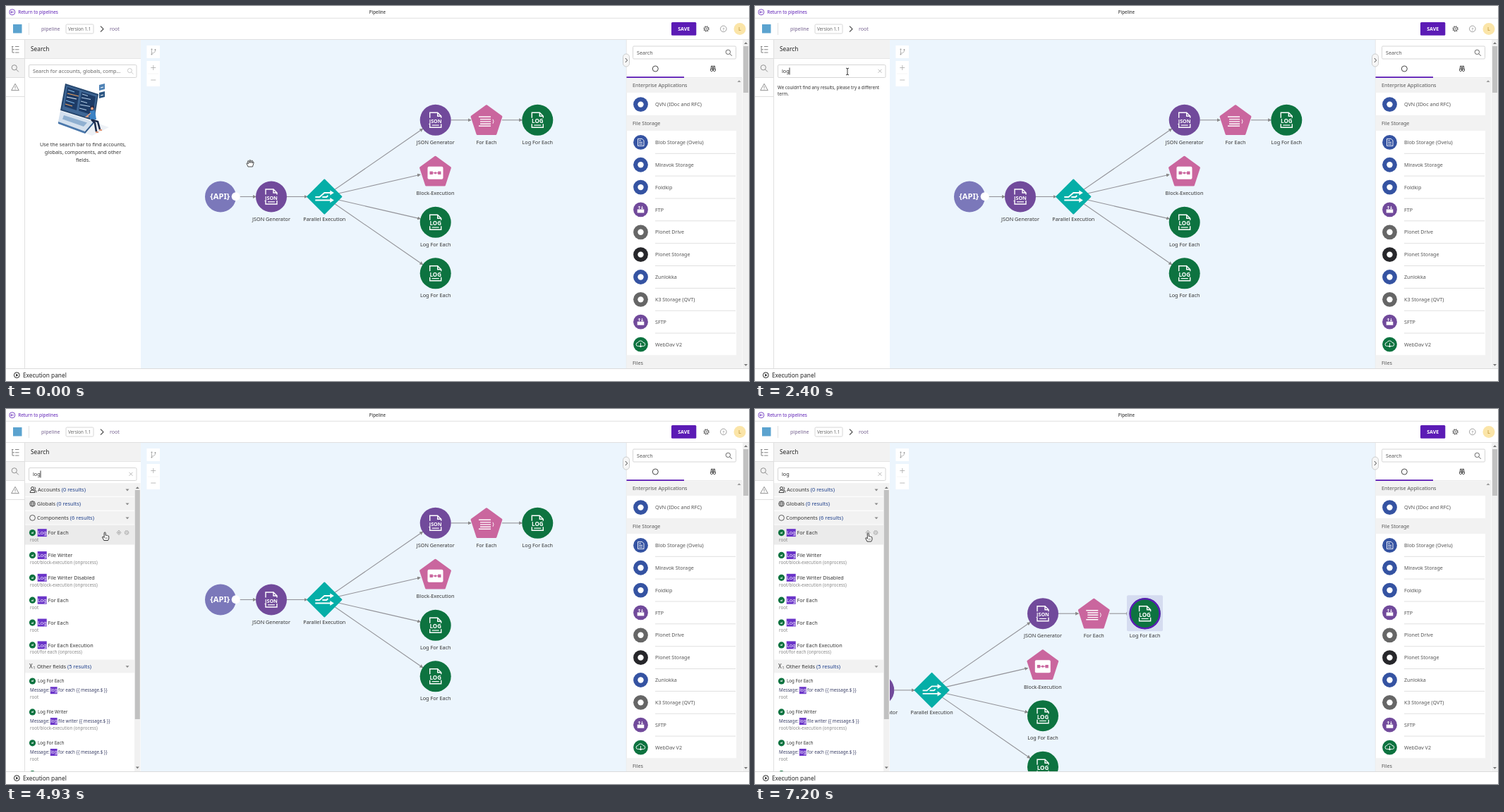
An HTML page that plays this animation: 1053 by 532 pixels, repeating every 8 s.

```html
<!DOCTYPE html>
<html lang="en">
<head>
<meta charset="utf-8">
<title>Pipeline search</title>
<style>
html, body { margin: 0; width: 100%; height: 100%; overflow: hidden; background: #fff; }
svg { display: block; width: 1053px; height: 532px; font-family: "Noto Sans", "Open Sans", sans-serif; }
</style>
</head>
<body>
<svg id="stage" viewBox="0 0 1053 532"></svg>
<script>
const PURPLE = '#5b1bb5', VIOLET = '#714a9b', GREEN = '#0d7340', BLUE = '#3553a2', TEAL = '#05aea7',
      PINK = '#ca669e', GREY = '#f2f2f2', LINE = '#d9d9d9', SKY = '#ecf5fd', INK = '#333';
const BODY = 7.26, SMALL = 6.22, BIG = 8.3;

// y is the visual middle of the text
const text = (x, y, str, size = BODY, fill = INK, more = '') =>
  `<text x="${x}" y="${y + size * .36}" font-size="${size}" fill="${fill}" ${more}>${str}</text>`;
const mid = (x, y, str, size, fill, more = '') => text(x, y, str, size, fill, 'text-anchor="middle" ' + more);
const rect = (x, y, w, h, fill, more = '') => `<rect x="${x}" y="${y}" width="${w}" height="${h}" fill="${fill}" ${more}/>`;
const circle = (x, y, r, fill, more = '') => `<circle cx="${x}" cy="${y}" r="${r}" fill="${fill}" ${more}/>`;
const path = (d, stroke = '#666', width = .8, fill = 'none', more = '') =>
  `<path d="${d}" stroke="${stroke}" stroke-width="${width}" fill="${fill}" ${more}/>`;
const shape = (points, fill, more = '') => `<polygon points="${points}" fill="${fill}" ${more}/>`;
const at = (x, y, body) => `<g transform="translate(${x} ${y})">${body}</g>`;
const group = (id, body) => `<g id="${id}">${body}</g>`;
const box = (x, y, w, h, stroke = '#ccc') => rect(x + .5, y + .5, w, h, '#fff', `rx="1.5" stroke="${stroke}" stroke-width=".8"`);
const lens = (x, y, r, stroke) => at(x, y, path(`M${r * .55} ${r * .55}L${r * 1.5} ${r * 1.5}`, stroke) +
  circle(-r * .2, -r * .2, r, 'none', `stroke="${stroke}" stroke-width=".8"`));
const gear = (x, y, r, stroke) => circle(x, y, r, 'none', `stroke="${stroke}" stroke-width="${r * .45}" stroke-dasharray="${r * .42} ${r * .365}"`) +
  circle(x, y, r * .75, 'none', `stroke="${stroke}" stroke-width=".7"`) + circle(x, y, r * .25, stroke);
const triangle = (x, y, dir, fill = '#777') => path(`M${x - 2.5} ${y - dir}h5l-2.5 ${dir * 2.8}z`, 'none', 0, fill);

// Pipeline nodes
const label = (str, y = 31.5) => mid(0, y, str);
const fileNode = (x, y, name, tag, fill, size) => at(x, y, circle(0, 0, 22, fill) +
  path('M-8 -3V-10.5H3L8 -5.5V-3M3 -10.5V-5.5H8', '#fff', 1.4) +
  path('M-8 5.5V10.5H8V5.5', '#fff', 1.4) + path('M-5 7.3H5', '#fff', 1.2) +
  mid(0, 1.5, tag, size, '#fff', 'font-weight="700"') + label(name));
const jsonNode = (x, y) => fileNode(x, y, 'JSON Generator', 'JSON', VIOLET, 7.2);
const logNode = (x, y) => fileNode(x, y, 'Log For Each', 'LOG', GREEN, 8);
const pentagon = Array.from({ length: 5 }, (_, i) => {
  const a = (i * 72 - 90) * Math.PI / 180;
  return `${22 * Math.cos(a)},${2 + 22 * Math.sin(a)}`;
}).join(' ');
const pentaNode = (x, y, name, icon) => at(x, y,
  shape(pentagon, PINK, `stroke="${PINK}" stroke-width="3" stroke-linejoin="round"`) + icon + label(name));

// Links run from centre to centre and stop at the rim of each node
function link([x1, y1], [x2, y2], from = 22, to = 22) {
  const d = Math.hypot(x2 - x1, y2 - y1), ux = (x2 - x1) / d, uy = (y2 - y1) / d;
  return path(`M${x1 + ux * from} ${y1 + uy * from}L${x2 - ux * to} ${y2 - uy * to}`, '#939399', 1.1, 'none', 'marker-end="url(#tip)"');
}
const api = [304, 270.5], json = [376, 270.5], split = [451.3, 270.5], json2 = [608.7, 161.8], each = [681, 161.8],
      log = [753.3, 161.8], block = [608.5, 234.3], log2 = [608.7, 306.8], log3 = [608.7, 379.3];

const pipeline =
  link(api, json, 27) + link(json, split, 22, 24.5) + [json2, block, log2, log3].map(n => link(split, n, 18)).join('') +
  link(json2, each) + link(each, log) +
  group('selection', rect(727.7, 135.8, 51, 51, '#d5dcf0', 'rx="2"')) +
  circle(...api, 22, '#7b78ba') + circle(325.7, 270.2, 6, '#fff') +
  mid(303.3, 270, '{API}', 11.2, '#fff', 'font-weight="700"') +
  jsonNode(...json) +
  at(...split, shape('0,-24 24,0 0,24 -24,0', TEAL, `stroke="${TEAL}" stroke-width="2" stroke-linejoin="round"`) +
    path('M-13 .5H-7L0 -5.5H9M-13 5H9M-3 .5H3L5 -1.5', '#fff', 1.9) +
    path('M8 -9l5.5 3.5l-5.5 3.5zM8 1.5l5.5 3.5l-5.5 3.5z', 'none', 0, '#fff') + label('Parallel Execution')) +
  jsonNode(...json2) +
  pentaNode(...each, 'For Each', path('M-11 -4.5H6M-9 -1.2H6M-9 2.1H6M-9 5.4H6M-11 8.5H6', '#fff', 1.4) + path('M9 -1q2 3 0 6', '#fff', .9)) +
  logNode(...log) +
  pentaNode(...block, 'Block-Execution', rect(-11, -6.5, 22, 18, '#fff', 'rx="2"') +
    path('M-5 2.5H5', PINK, 1) + rect(-8, .3, 4.4, 4.4, PINK) + circle(0, 2.5, 1.6, PINK) + rect(3.6, .3, 4.4, 4.4, PINK)) +
  logNode(...log2) + logNode(...log3) +
  group('ring', circle(...log, 21, 'none', `stroke="${PURPLE}" stroke-width="2.4"`));

const controls = rect(199.5, 56, 18.5, 18, '#fff') + rect(199.5, 78, 18.5, 36, '#fff') +
  path('M206.5 62.5v5M206.5 67q5 0 5 -4', '#999', .7) + circle(206.5, 61.5, 1, '#999') + circle(206.5, 68.5, 1, '#999') + circle(211.5, 62, 1, '#999') +
  path('M205.3 87.5h7M208.8 84v7M205.3 105h7', '#aaa', .8) + path('M201 96h15', '#eee', .6);

// Header, rail and footer
const chrome = rect(0, 0, 1053, 48, '#fff') + path('M0 17.3H1053M0 47.5H1053', LINE, .8) +
  circle(8.8, 8.7, 4, 'none', `stroke="${PURPLE}" stroke-width=".8"`) + path('M11 8.7H6.7M8.5 6.9L6.7 8.7l1.8 1.8', PURPLE) +
  text(17.3, 8.7, 'Return to pipelines', 6.35, PURPLE) + mid(526.5, 8.7, 'Pipeline', SMALL, '#222') +
  rect(10, 26, 12.5, 12.5, '#5ba3cf') + path('M32.5 24V41', LINE) +
  text(50, 32.5, 'pipeline', 7.1, '#75618f') + box(84.5, 25.5, 39, 13) + text(88, 32.5, 'Version 1.1', SMALL, '#666') +
  path('M134 28.7l4 4l-4 4', '#444', 1.1) + text(147, 32.5, 'root', 7.1, '#75618f') +
  rect(943, 23, 35.3, 18.8, PURPLE, 'rx="1.5"') + mid(960.7, 32.5, 'SAVE', 7, '#fff', 'font-weight="700"') +
  gear(992.6, 32.4, 3.4, '#555') + circle(1016.8, 32.4, 4.3, 'none', 'stroke="#888" stroke-width=".8"') + mid(1016.8, 32.4, '?', 6, '#777') +
  circle(1040, 32.5, 8.5, '#fbe5a8') + mid(1040, 32.5, 'L', 7.3, '#b98a2c');
const rail = rect(0, 48, 191, 467, '#fff') + rect(0, 74.5, 26, 27, GREY) + path('M26.5 48V515M0 74.5H26M0 101.5H26M0 128.5H26', LINE, .8) +
  path('M9 57.5V66H12M9 61.8H12M13 57.5H18.5M13 61.8H18.5M13 66H18.5M8 57.5H10.5', '#777', .9) + lens(12.5, 88, 3.6, '#777') +
  path('M13 110.3L18.3 119.7H7.7zM13 113.6V116.7M13 117.6V118.5', '#777', .8) +
  rect(27, 48, 164, 26.5, GREY) + path('M27 74.5H191', LINE, .6) + text(35, 61.2, 'Search', BIG, '#222') + box(32, 83, 152.5, 18);
const footer = rect(0, 514.5, 1053, 18, '#fff') + path('M0 514.5H1053', LINE, .9) +
  circle(15.3, 523.7, 3.9, 'none', 'stroke="#222" stroke-width="1"') + path('M14.2 521.7l3.2 2l-3.2 2z', 'none', 0, '#222') +
  text(24, 523.7, 'Execution panel', BIG, '#222');

// Component palette on the right
const plainMark = y => circle(899.5, y, 4.2, '#fff');
const transferMark = y => path(`M894.7 ${y - .5}h9.6v5h-9.6z`, 'none', 0, '#fff') +
  path(`M897.5 ${y - 1}v-4m-1.5 1.5l1.5 -1.5l1.5 1.5M901.5 ${y - 5}v4m-1.5 -1.5l1.5 1.5l1.5 -1.5`, '#fff', .9);
const docMark = y => path(`M895.5 ${y - 5}h6l2.5 2.5v7.5h-8.5zM897 ${y}h5M897 ${y + 2.5}h5M897 ${y - 2.5}h3`, '#fff', .9);
const cloudMark = y => path(`M895.5 ${y + 2.5}a2.5 2.5 0 0 1 0 -5a4 4 0 0 1 7.5 0a2.5 2.5 0 0 1 .5 5zM899.5 ${y - 2}v6m-2 -2l2 2l2 -2`, '#fff', .9);
const item = ([name, fill, mark], y) => circle(899.5, y, 10.4, fill) + mark(y) +
  text(920, y, name, 7.15, '#555', 'font-weight="300"');
const files = [
  ['Blob Storage (Ovelu)', BLUE, docMark], ['Miravok Storage', BLUE, plainMark], ['Foldkip', BLUE, plainMark],
  ['FTP', VIOLET, transferMark], ['Plonet Drive', '#666', plainMark], ['Plonet Storage', '#27272b', plainMark],
  ['Zunlokka', BLUE, plainMark], ['K3 Storage (QVT)', '#666', plainMark], ['SFTP', VIOLET, transferMark], ['WebDav V2', GREEN, cloudMark]
];
const section = (y, h, name, textY) => rect(879.5, y, 155.5, h, GREY) + text(888, textY, name, 7.15, '#555');
const palette = rect(879, 48, 174, 467, '#fff') + path('M879.3 48V515', LINE, .6) + box(888, 56.5, 146, 18) +
  text(894, 66, 'Search', 7.15, '#555') + lens(1024, 66, 3.2, '#444') +
  circle(920.3, 89, 4, 'none', 'stroke="#333" stroke-width=".9"') +
  path('M999 86l1 -1h1.2v6M1005 86l-1 -1h-1.2v6M1001.2 88h1.6M998.6 91l1 -5M1005.4 91l-1 -5', '#333', .9) +
  circle(1000, 91, 1.6, '#fff', 'stroke="#333" stroke-width=".8"') + circle(1004, 91, 1.6, '#fff', 'stroke="#333" stroke-width=".8"') +
  path('M879 101.7H1043', LINE, .6) + rect(879.5, 100.2, 81.5, 1.8, PURPLE) +
  rect(1035, 102, 8.5, 413, GREY) + triangle(1039, 107, -1, '#999') +
  section(102.5, 20.5, 'Enterprise Applications', 112.6) + item(['QVN (IDoc and RFC)', BLUE, plainMark], 139.6) + section(155, 22, 'File Storage', 166.3) +
  files.map((f, i) => item(f, 193.4 + i * 31.85) + (i < 9 ? path(`M920 ${209.3 + i * 31.85}H1034`, LINE, .8) : '')).join('') +
  section(495.3, 20, 'Files', 506.6) +
  rect(1044, 48, 9, 467, '#f1f1f1') + rect(1045, 57, 7, 66, '#c1c1c1') + triangle(1048.5, 53, -1) + triangle(1048.5, 509, 1) +
  rect(874.5, 68, 9, 18, '#f6f6f6', 'rx="4.5" stroke="#bbb" stroke-width=".7"') + path('M877.8 74l2.8 3l-2.8 3', '#333', .9);

// Search panel states
const codeLine = i => path(`M${88 - i} ${119 + i * 5}l${9 + i * 7 % 9} ${3 + i % 2}`, ['#7fb7e6', '#f0a35e', '#e4eef8'][i % 3], 1.1) +
  path(`M${108 - i} ${125 + i * 5}l${8 + i * 5 % 9} 2.5`, '#b9d3ec', 1);
const illustration = shape('73,166 98,156 146,172 122,184', '#edf1f6') +
  shape('84,110 131,125 125,163 77,148', '#27486f') + shape('85.5,112.5 129,126.5 123.5,160.5 79.5,146.5', '#3f6796') +
  shape('87,115 104,120.5 100,148 83,142.5', '#1d3b66') + shape('107,122 127,128.5 123,155 103,148.5', '#1d3b66') +
  [0, 1, 2, 3, 4].map(codeLine).join('') +
  shape('77,149 124,164 112,178 74,164', '#d3e0ee') + shape('74,164 112,178 112,181 74,167', '#4a78ab') + shape('112,178 124,164 124,167 112,181', '#315b8c') +
  shape('82,155 115,165.5 110,171 80,160.5', '#8fb0d1') +
  shape('132,112 140,110 140,118 132,120', '#4f82b5') + shape('132,123 140,121 140,129 132,131', '#2b5582') + path('M134 116l4 -1M134 127l4 -1', '#fff', 1) +
  circle(122.5, 144, 2.7, '#2a2a44') + circle(122, 145.5, 1.9, '#e9a582') + shape('119,149 126,148 128,161 119,161', '#3b82c4') +
  path('M120 152L114 157H117', '#e9a582', 1.6) + path('M123 162L130 164L133 175M121 161L126 166L128 178', '#1b2a4a', 2.6) + path('M127 179h4M132 176h4', '#e07a4b', 1.6);
const hint = illustration + ['Use the search bar to find accounts,', 'globals, components, and other', 'fields.']
  .map((s, i) => mid(109, 196.7 + i * 10.6, s)).join('');
const notFound = text(32, 115.5, 'We couldn’t find any results, please try a different', SMALL) + text(32, 125, 'term.', SMALL);

const heading = (y, name, count, x, icon) => rect(27, y - 9.6, 155, 18.8, GREY) + icon + triangle(172, y, 1, '#888') +
  text(x, y, `${name} <tspan fill="#1d3f8b">(${count} results)</tspan>`, 7.45, INK, 'font-weight="500"');
const dot = (x, y, r = 4.6) => circle(x, y, r, GREEN) + mid(x, y, 'ol', 4, '#fff', 'font-weight="700"');
const row = (y, rest, where) => dot(37.5, y) + rect(44.7, y - 5.5, 13, 11, '#6b35c9') +
  text(45, y, `<tspan fill="#fff">Log</tspan> ${rest}`) + text(34, y + 10.3, where, SMALL, '#888');
const field = (y, name, message, where) => dot(37.5, y) + text(45, y, name, SMALL) + rect(62.8, y + 8.2, 9.8, 10, '#6b35c9') +
  text(34, y + 13.2, `Message: <tspan fill="#fff">log</tspan> ${message} {{ message.$ }}`, SMALL, '#3a3f66') + text(34, y + 23, where, SMALL, '#888');
const rows = [['For Each', 'root'], ['File Writer', 'root/block-execution (onprocess)'], ['File Writer Disabled', 'root/block-execution (onprocess)'],
  ['For Each', 'root'], ['For Each', 'root'], ['For Each Execution', 'root/for each (onprocess)']];
const results = heading(114.6, 'Accounts', 0, 45, path('M34 118.5q0 -3.5 3.5 -3.5t3.5 3.5zM40 114.5q3 .5 3 4', INK, .9) + circle(37.5, 112.5, 2, 'none', 'stroke="#333"') + path('M40.5 110.7a1.9 1.9 0 0 1 0 3.6', INK, .9)) +
  heading(134.5, 'Globals', 0, 44, circle(37.5, 134.5, 3.9, 'none', 'stroke="#333" stroke-width=".7"') + path('M33.6 134.5h7.8M34.3 132.3h6.4M34.3 136.7h6.4M37.5 130.6q-3.6 3.9 0 7.8q3.6 -3.9 0 -7.8', INK, .6)) +
  heading(154.4, 'Components', 6, 44, circle(37.5, 154.4, 3.9, 'none', 'stroke="#333" stroke-width=".8"')) +
  group('hover', rect(27, 164.5, 155, 28, '#ebebeb') + path('M160 172l3 3.3l-3 3.3l-3 -3.3zM160 173.5v3.6M158.2 175.3h3.6', '#aaa', .9) + gear(171, 175.3, 2.8, '#aaa')) +
  rows.map((r, i) => row(175.6 + i * 31.87, ...r)).join('') +
  heading(365.2, 'Other fields', 5, 44, text(33, 364.8, 'X', 8) + text(38.5, 367, '1', 5)) +
  field(386, 'Log For Each', 'for each', 'root') + field(429.9, 'Log File Writer', 'file writer', 'root/block-execution (onprocess)') +
  field(473.8, 'Log For Each', 'for each', 'root') + dot(37.5, 517.7) + text(45, 517.7, 'Log For Each', SMALL) +
  rect(182, 105, 8.5, 410, '#f1f1f1') + rect(182.8, 115, 7, 325, '#c1c1c1') + triangle(186.3, 112, -1) + triangle(186.3, 508.5, 1);

const cursors =
  group('grab', path('M-3 5L-5 .5q.3 -1.5 1.7 -.5L-2.7 1L-3.5 -3q.8 -1.4 1.7 0L-1 -.5L-1 -4q.9 -1.2 1.8 0L1 -.5L2 -3.5q1 -.8 1.6 .3L3 0L4 -1.6q1 -.4 1.2 .7L3.5 5z', '#222', .8, '#fff', 'stroke-linejoin="round"')) +
  group('arrow', path('M-2.5 -5V4L-.4 2.2L1 5.3L2.4 4.7L1 1.7H4z', '#222', .7, '#fff')) +
  group('beam', path('M-2 -4.8Q0 -4.8 0 -3.6Q0 -4.8 2 -4.8M0 -4V4M-2 4.8Q0 4.8 0 3.6Q0 4.8 2 4.8', '#222', .9)) +
  group('hand', path('M-2 6L-4.3 1.6q0 -1.6 1.8 -.5L-1.7 2V-5q1 -1.4 2 0V-1.2q1 -.9 1.6 .2q1 -.7 1.6 .4q1.2 -.4 1.4 .8V3.4L3.7 6z', '#222', .9, '#fff', 'stroke-linejoin="round"') + path('M.5 1.5V4M2.3 1.5V4', '#222', .5));

document.getElementById('stage').innerHTML =
  `<defs><marker id="tip" viewBox="0 0 6 6" refX="5" refY="3" markerWidth="5" markerHeight="5" markerUnits="userSpaceOnUse" orient="auto"><path d="M0 0L6 3L0 6z" fill="#888"/></marker></defs>` +
  rect(191, 48, 688, 467, SKY) + group('pipeline', pipeline) + controls + rail +
  group('hint', hint) + group('notFound', notFound) + group('results', results) +
  `<text id="query" x="38" y="95.1" font-size="${BODY}"></text>` + group('lens', lens(176, 92.2, 3, '#bbb')) +
  group('clear', path('M174.5 89.8l5 5m0 -5l-5 5', '#aaa', .8)) + group('caret', rect(0, 87.5, .8, 10, '#111')) +
  palette + chrome + footer + group('pointer', cursors);

const el = id => document.getElementById(id);
const show = (id, on) => el(id).style.display = on ? '' : 'none';
const move = (id, x, y) => el(id).setAttribute('transform', `translate(${x} ${y})`);

// time, x, y of the mouse
const track = [[0, 346, 223], [733, 131, 93], [4133, 131, 93], [5000, 141, 182], [5667, 129, 182], [5867, 129, 182], [6400, 161, 182], [8000, 161, 182]];
function mouse(t) {
  const i = track.findIndex((k, n) => n && t <= k[0]);
  const [t0, x0, y0] = track[i - 1], [t1, x1, y1] = track[i];
  const u = (t - t0) / (t1 - t0), e = u * u * (3 - 2 * u);
  return [x0 + (x1 - x0) * e, y0 + (y1 - y0) * e];
}
function caretOn(t) {
  if (t < 1000 || t >= 6867) return false;
  if (t < 2000) return t < 1600;
  return t < 2400 || Math.floor((t - 2400 + 5) / 533.3) % 2 === 0;
}

function draw(now) {
  // the picture advances 15 times per second
  const t = Math.floor(now % 8000 * .015 + .1) / .015 % 8000;
  const typed = t < 1995 ? '' : t < 2262 ? 'l' : t < 2395 ? 'lo' : 'log';
  const found = t >= 2995, focused = t >= 995, moved = t >= 7195;
  el('query').textContent = typed || 'Search for accounts, globals, comp' + (focused ? 'on' : '...');
  el('query').setAttribute('fill', typed ? '#333' : '#666');
  show('hint', !typed);
  show('lens', !typed);
  show('clear', typed);
  show('notFound', typed && !found);
  show('results', found);
  show('caret', caretOn(t + 2));
  move('caret', [38, 40, 44.4, 48.6][typed.length], 0);
  move('pipeline', moved ? -200.7 : 0, moved ? 128.4 : 0);
  show('selection', moved);
  show('ring', moved);
  const [x, y] = mouse(t);
  const kind = x >= 191 ? 'grab' : y >= 83 && y <= 101 && x < 169 ? 'beam' : found && y > 104 ? 'hand' : 'arrow';
  for (const id of ['grab', 'arrow', 'beam', 'hand']) show(id, id === kind);
  show('hover', found && y > 164.5);
  move('pointer', x, y);
}

const start = performance.now();
(function loop() {
  draw(performance.now() - start);
  requestAnimationFrame(loop);
})();
</script>
</body>
</html>
```
